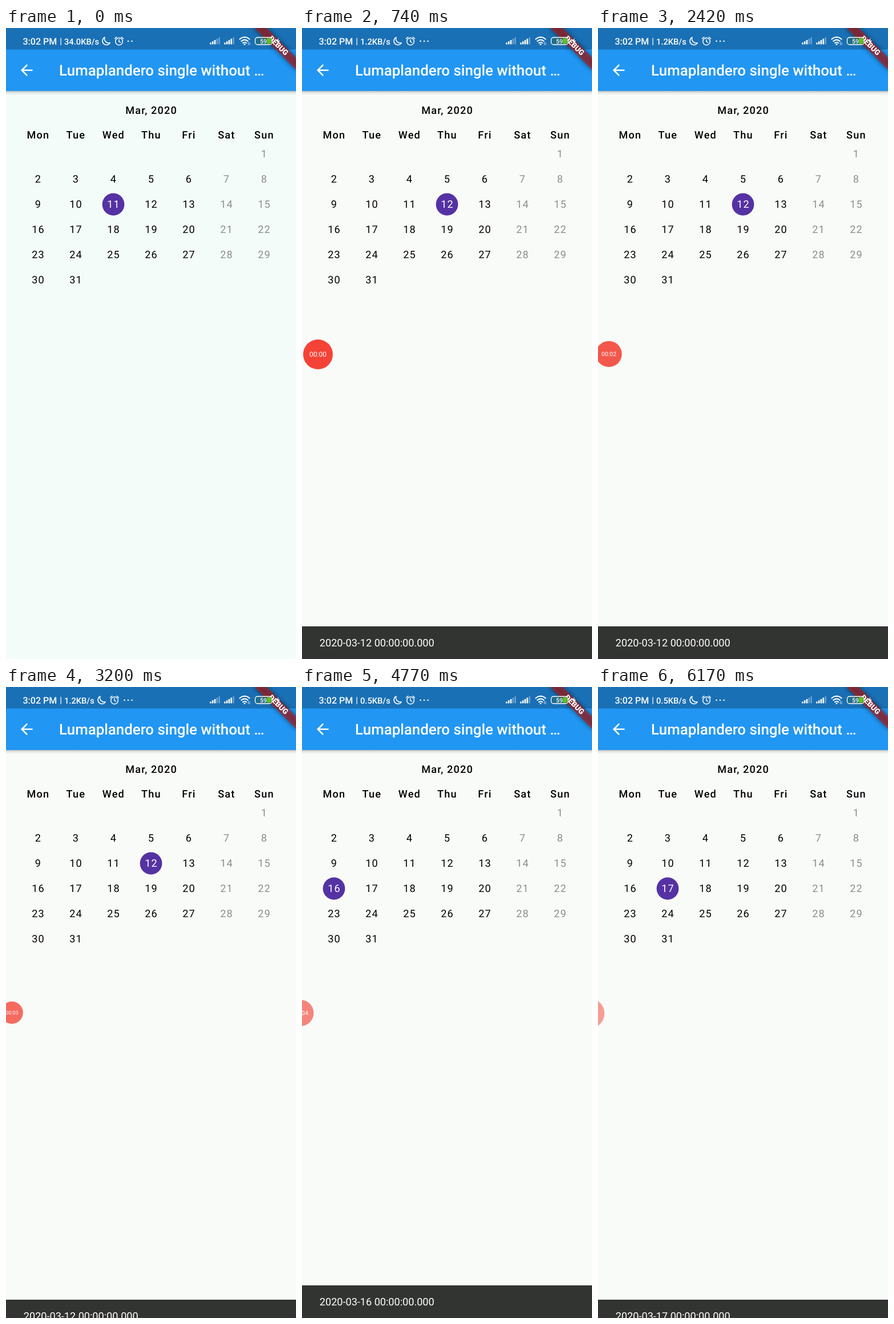
An HTML page that plays this animation: 508 by 1102 pixels, repeating every 6.23 s.

```html
<!DOCTYPE html>
<html lang="en">
<head>
<meta charset="utf-8">
<title>Calendar</title>
<style>
html, body { margin: 0; width: 100%; height: 100%; overflow: hidden; background: #f9fbf8; }
svg { display: block; width: 508px; height: 1102px; font-family: Roboto, sans-serif; text-rendering: geometricPrecision; }
.mid { text-anchor: middle; }
.cal { font-size: 18.1px; letter-spacing: 1.2px; }
.bold { font-weight: 500; }
.line { fill: none; stroke: #fff; stroke-linecap: round; stroke-linejoin: round; }
</style>
</head>
<body>
<svg id="stage" viewBox="0 0 508 1102">
  <defs>
    <linearGradient id="shade" x2="0" y2="1">
      <stop offset="0" stop-color="#000" stop-opacity=".26"/>
      <stop offset=".4" stop-color="#000" stop-opacity=".09"/>
      <stop offset="1" stop-color="#000" stop-opacity="0"/>
    </linearGradient>
    <filter id="soft" x="-20%" y="-100%" width="140%" height="300%">
      <feGaussianBlur stdDeviation="4.5"/>
    </filter>
  </defs>

  <rect id="page" width="508" height="1102" fill="#f9fbf8"/>
  <g id="calendar"></g>

  <rect y="110" width="508" height="7" fill="url(#shade)"/>
  <rect width="508" height="110" fill="#2196f3"/>
  <rect width="508" height="37.5" fill="#1a70b5"/>
  <path transform="translate(20.7 58.2) scale(1.293)" fill="#fff"
    d="M20 11H7.83l5.59-5.59L12 4l-8 8 8 8 1.41-1.41L7.83 13H20z"/>
  <text class="bold" x="93" y="82.8" font-size="25.85" fill="#fff">Lumaplandero single without …</text>

  <g id="snack">
    <rect y="1045" width="508" height="60" fill="#323431"/>
    <text id="message" x="30.8" y="1080.1" font-size="18.1" fill="#fff"></text>
  </g>

  <g transform="translate(508 0) rotate(45)">
    <rect x="-52" y="36.2" width="104" height="15.5" filter="url(#soft)" opacity=".5"/>
    <rect x="-52" y="36.2" width="104" height="15.5" fill="#b71c1c" fill-opacity=".627"/>
    <text class="mid" y="47.8" font-size="13.2" font-weight="900" fill="#fff">DEBUG</text>
  </g>

  <g id="status" fill="#fff">
    <g class="bold">
      <text x="29.5" y="28.5" font-size="16">3:02 PM</text>
      <text x="94.3" y="28" font-size="15">|</text>
      <text id="speed" x="102" y="28.5" font-size="14.7"></text>
    </g>
    <g id="modes" class="line" stroke-width="1.5">
      <path d="M165 16.2a7 7 0 1 0 9.2 9.6a7.4 7.4 0 0 1-9.2-9.6z"/>
      <circle cx="190" cy="23.5" r="6.3"/>
      <path d="M190 20v3.8l2.6 1.4M182.6 18.6l3.2-2.8M197.4 18.6l-3.2-2.8"/>
    </g>
    <circle id="dot" cx="207.5" cy="23" r="1.3"/>
    <circle cx="214" cy="23" r="1.3"/>
    <circle cx="220.5" cy="23" r="1.3"/>
    <g id="bars"></g>
    <path class="line" stroke-width="2.1"
      d="M409.5 19.6a12 12 0 0 1 17 0M412.3 23a8 8 0 0 1 11.4 0M415 26.2a4.3 4.3 0 0 1 6 0"/>
    <circle cx="418" cy="28.5" r="1.5"/>
    <path d="M424.5 25v5M427 25v5" stroke="#fff" stroke-width="1" opacity=".75"/>
    <rect x="436.5" y="16.5" width="29.5" height="12.5" rx="4" fill="#2b6c55" fill-opacity=".45" stroke="#fff" stroke-width="1.3"/>
    <path d="M457 18h5q2.500 0 2.500 2.500v4.500q0 2.500-2.500 2.500h-5z" fill="#57c51d"/>
    <text class="mid bold" x="451" y="26.6" font-size="10.5">59</text>
    <path d="M477.500 17.500l-4.500 6h3l-1 5 5-6.500h-3.200z"/>
  </g>

  <g id="timer">
    <circle r="26" fill="#f44336"/>
    <text id="clock" class="mid" y="4.3" font-size="12" fill="#fff"></text>
  </g>
</svg>
<script>
const LOOP = 6230;
const byId = id => document.getElementById(id);

function add(parent, tag, attrs, text = '') {
  const el = document.createElementNS('http://www.w3.org/2000/svg', tag);
  for (const key in attrs) el.setAttribute(key, attrs[key]);
  el.textContent = text;
  parent.append(el);
  return el;
}

// Calendar: 1 March 2020 is a Sunday
const calendar = byId('calendar');
const colX = col => 56 + 66 * col;
const place = day => ({ x: colX((day + 5) % 7), row: Math.floor((day + 5) / 7) });
const inkOf = day => (day + 5) % 7 > 4 ? '#8c8e8c' : '#000';

add(calendar, 'text', { class: 'cal bold mid', x: 254.6, y: 149.8 }, 'Mar, 2020');
['Mon', 'Tue', 'Wed', 'Thu', 'Fri', 'Sat', 'Sun'].forEach((name, col) =>
  add(calendar, 'text', { class: 'cal bold mid', x: colX(col) + 0.4, y: 192.9 }, name));

const marker = add(calendar, 'circle', { r: 19.4, fill: '#5532a3' });
const days = [];
for (let day = 1; day <= 31; day++) {
  const { x, row } = place(day);
  days[day] = add(calendar, 'text', { class: 'cal mid', x: x + 0.5, y: 226.3 + 44 * row }, day);
}

// Signal strength
[[357, 3], [382, 4]].forEach(([x, full]) => {
  for (let i = 0; i < 5; i++) {
    const h = 3 + 2.3 * i;
    add(byId('bars'), 'rect', {
      x: x + 3.8 * i, y: 28.5 - h, width: 2.6, height: h, rx: 0.6, opacity: i < full ? 1 : 0.35
    });
  }
});

// Hard steps: [time, value...]
const picks = [[0, 11], [240, 12], [4410, 16], [5720, 17]];
const speeds = [[0, '34.0'], [180, '1.2'], [4110, '0.5']];
const clocks = [[0, 0], [960, 1], [1960, 2], [2960, 3], [3930, 4], [4930, 5], [5930, 6]];

const rise = start => [[start, 37, 0], [start + 60, 12, 0], [start + 120, 3, 0.5], [start + 180, 0, 1]];
const fall = start => [[start, 25, 1], [start + 60, 50, 1], [start + 120, 60, 1]];
const snacks = [
  [0, 60, 0],
  ...rise(300), ...fall(3200),
  ...rise(4470), ...fall(5010),
  ...rise(5780), ...fall(6170)
];

// Smooth moves: [time, x, y, radius, opacity]
const timerMoves = [
  [0, 28, 570, 26, 1],
  [2300, 28, 570, 26, 1],
  [2540, 10.3, 568.7, 19.5, 0.78],
  [4650, 10.3, 568.7, 19.5, 0.78],
  [4890, -14.6, 570, 26, 0.5],
  [LOOP, -14.6, 570, 26, 0.5]
];

const stepAt = (table, t) => table.filter(row => row[0] <= t).pop();

function tweenAt(table, t) {
  const i = table.findIndex(row => row[0] > t);
  const a = table[i - 1], b = table[i];
  const p = (t - a[0]) / (b[0] - a[0]);
  const ease = p * p * (3 - 2 * p);
  return a.map((v, k) => v + (b[k] - v) * ease);
}

function setText(el, text) {
  if (el.textContent !== text) el.textContent = text;
}

function draw(t) {
  const picked = stepAt(picks, t)[1];
  const spot = place(picked);
  marker.setAttribute('cx', spot.x);
  marker.setAttribute('cy', 220 + 44 * spot.row);
  days.forEach((el, day) => el.setAttribute('fill', day === picked ? '#fff' : inkOf(day)));

  const [, drop, fade] = stepAt(snacks, t);
  byId('snack').setAttribute('transform', `translate(0 ${drop})`);
  byId('message').setAttribute('opacity', fade);
  setText(byId('message'), `2020-03-${picked} 00:00:00.000`);

  const speed = stepAt(speeds, t)[1];
  const wide = speed.length > 3;
  setText(byId('speed'), speed + 'KB/s');
  byId('modes').setAttribute('transform', `translate(${wide ? 8 : 0} 0)`);
  byId('dot').setAttribute('opacity', wide ? 0 : 1);

  const tint = Math.max(0, 1 - Math.max(0, t - 60) / 500);
  byId('page').setAttribute('fill', `rgb(${249 - 5 * tint},${251 + tint},${248 + 2 * tint})`);

  const [, x, y, r, alpha] = tweenAt(timerMoves, t);
  const timer = byId('timer');
  timer.setAttribute('transform', `translate(${x} ${y}) scale(${r / 26})`);
  timer.setAttribute('opacity', t < 60 ? 0 : alpha);
  setText(byId('clock'), '00:0' + stepAt(clocks, t)[1]);
}

const begin = performance.now();
function tick() {
  draw((performance.now() - begin) % LOOP);
  requestAnimationFrame(tick);
}
tick();
</script>
</body>
</html>
```
